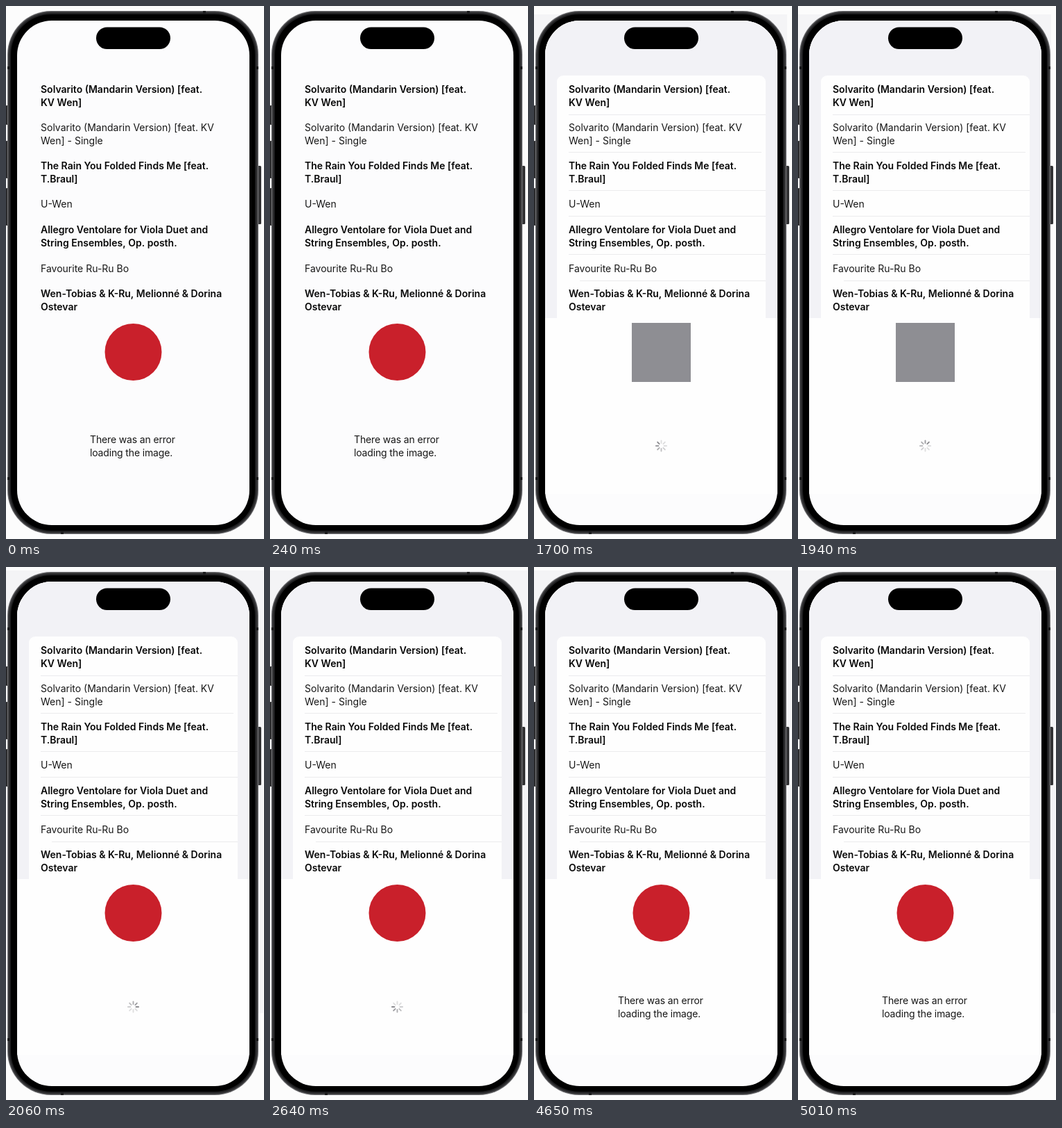
These frames come from a looping animation (372x767 px, 5610 ms). An HTML page with a canvas:

```html
<!DOCTYPE html>
<html lang="en">
<head>
<meta charset="utf-8">
<title>Image loading</title>
<style>
  html, body { margin: 0; width: 100%; height: 100%; overflow: hidden; background: #fcfcfc; }
  canvas { display: block; width: 372px; height: 767px; }
</style>
</head>
<body>
<canvas id="stage"></canvas>
<script>
const W = 372, H = 767, LOOP = 5610, STEP = 120;
const RELOAD = 1580, LISTED = 1700, LOADED = 2060, FAILED = 2880;
const PAPER = '#fcfcfd';

const canvas = document.getElementById('stage');
const ctx = canvas.getContext('2d');
const dpr = window.devicePixelRatio || 1;
canvas.width = W * dpr;
canvas.height = H * dpr;

// [baseline, semibold, ...lines]
const rows = [
  [124.5, true, 'Solvarito (Mandarin Version) [feat.', 'KV Wen]'],
  [179.5, false, 'Solvarito (Mandarin Version) [feat. KV', 'Wen] - Single'],
  [234.5, true, 'The Rain You Folded Finds Me [feat.', 'T.Braul]'],
  [290, false, 'U-Wen'],
  [326.5, true, 'Allegro Ventolare for Viola Duet and', 'String Ensembles, Op. posth.'],
  [382.5, false, 'Favourite Ru-Ru Bo'],
  [418.5, true, 'Wen-Tobias & K-Ru, Melionné & Dorina', 'Ostevar']
];
// [y, left, right]
const dividers = [
  [156, 50, 334], [210, 50, 328], [265, 50, 334],
  [302, 50, 334], [357, 50, 334], [395, 66, 334]
];

function rect(x, y, w, h, color) {
  ctx.fillStyle = color;
  ctx.fillRect(x, y, w, h);
}

function round(x, y, w, h, r, color) {
  ctx.fillStyle = color;
  ctx.beginPath();
  ctx.roundRect(x, y, w, h, r);
  ctx.fill();
}

function text(lines, x, y, semibold, spacing) {
  ctx.font = `${semibold ? 600 : 400} 14px Inter, "Noto Sans", sans-serif`;
  ctx.letterSpacing = spacing + 'px';
  ctx.fillStyle = semibold ? '#080808' : '#171717';
  lines.forEach((line, i) => ctx.fillText(line, x, y + i * 19));
}

function drawTint(t) {
  if (t < RELOAD) return;
  if (t < LISTED) rect(5, 12, 351, 60, '#f5f5f6');
  else if (t < LOADED) rect(0, 12, 365, 437, '#f4f4f6');
  else rect(0, 5, 371, 637, '#f4f4f6');
}

function drawPhone() {
  for (const [y, h] of [[143, 28], [194, 54], [262, 54]]) {
    round(0, y, 5, h, 1, '#2b2b2d');
  }
  round(362, 230, 6, 84, 1.5, '#333335');
  round(2, 7, 362, 753, 63, '#77777a');
  round(3, 8, 360, 751, 62, '#39393b');
  round(5, 10, 356, 747, 60, '#202022');
  round(7, 12, 352, 743, 58, '#000');
  for (const y of [87, 678]) {
    rect(2, y, 4, 4, '#1b1b1c');
    rect(360, y, 4, 4, '#1b1b1c');
  }
  rect(284, 7, 4, 4, '#1b1b1c');
  rect(79, 756, 4, 4, '#1b1b1c');
}

function drawList(grouped) {
  if (grouped) {
    rect(16, 21, 335, 428, '#f2f2f6');
    round(33, 100, 301, 349, [9, 9, 0, 0], '#fefefe');
    for (const [y, left, right] of dividers) rect(left, y, right - left, 1, '#ebebed');
  }
  for (const [y, semibold, ...lines] of rows) text(lines, 50, y, semibold, 0);
}

function drawPicture(loaded) {
  if (!loaded) return rect(141, 456, 85, 85, '#8e8e93');
  ctx.fillStyle = '#c9202b';
  ctx.beginPath();
  ctx.arc(183.5, 498, 41, 0, Math.PI * 2);
  ctx.fill();
}

function drawSpinner(t) {
  const head = 4 + Math.floor((t - RELOAD) / STEP);
  ctx.lineWidth = 1.9;
  ctx.lineCap = 'round';
  for (let i = 0; i < 8; i++) {
    const a = (head - i) * Math.PI / 4;
    const c = Math.cos(a), s = Math.sin(a);
    ctx.strokeStyle = `rgba(60, 60, 67, ${Math.max(0.16, 0.58 - i * 0.085)})`;
    ctx.beginPath();
    ctx.moveTo(183.5 + 4 * c, 633 + 4 * s);
    ctx.lineTo(183.5 + 7.6 * c, 633 + 7.6 * s);
    ctx.stroke();
  }
}

function drawScreen(t) {
  const reloading = t >= RELOAD;
  const listed = t >= LISTED;
  ctx.save();
  ctx.beginPath();
  ctx.roundRect(16, 21, 335, 726, 50);
  ctx.clip();
  rect(16, 21, 335, 726, PAPER);
  if (reloading) rect(16, 21, 335, listed ? 681 : 631, '#fefefe');
  if (!reloading || listed) drawList(listed);
  drawPicture(!reloading || t >= LOADED);
  if (reloading && t < FAILED) drawSpinner(t);
  else text(['There was an error', 'loading the image.'], 121, 629, false, -0.15);
  ctx.restore();
  round(130, 30.5, 107, 31.5, 15.75, '#000');
}

function draw(t) {
  ctx.setTransform(dpr, 0, 0, dpr, 0, 0);
  rect(0, 0, W, H, '#fcfcfc');
  drawTint(t);
  drawPhone();
  drawScreen(t);
}

const start = performance.now();
function tick() {
  draw((performance.now() - start) % LOOP);
  requestAnimationFrame(tick);
}
tick();
</script>
</body>
</html>
```
